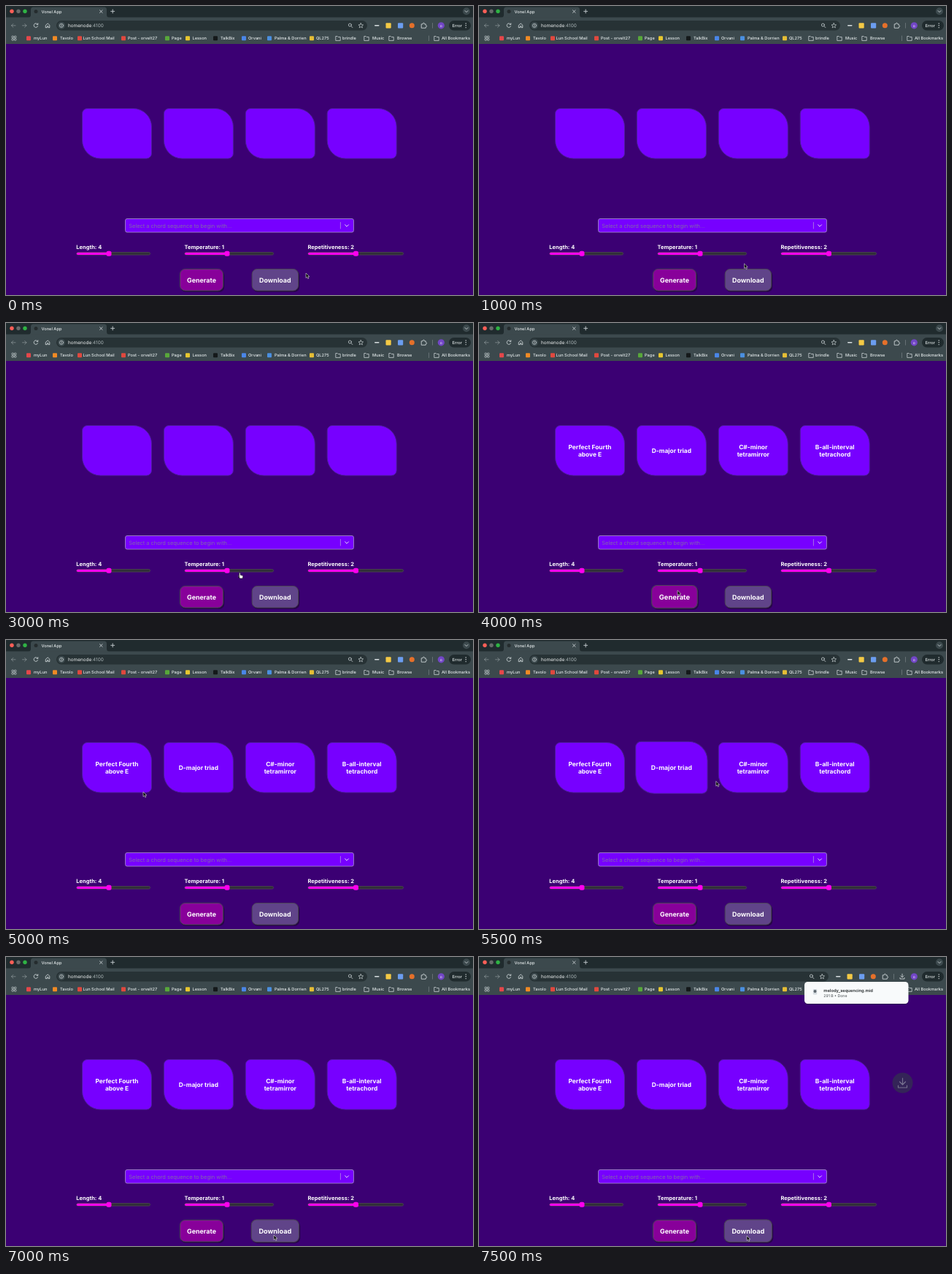
An HTML page for the animation above (8000 ms loop, 640 by 396 pixels).

```html
<!DOCTYPE html>
<html lang="en">
<head>
<meta charset="utf-8">
<title>Chord generator</title>
<style>
html, body { margin: 0; width: 100%; height: 100%; overflow: hidden; background: #3b0073; }
svg { display: block; width: 100vw; height: 100vh; font-family: Inter, "Open Sans", sans-serif; }
text { text-rendering: geometricPrecision; }
.mid { text-anchor: middle; }
.card, .btn { transform-box: fill-box; transform-origin: center; }
.bar { font-size: 5.7px; font-weight: 500; fill: #e3e9ea; }
.line { fill: none; stroke: #c9d1d3; stroke-linecap: round; stroke-linejoin: round; }
</style>
</head>
<body>
<svg id="stage" viewBox="0 0 640 396"></svg>
<script>
const STEP = 500, STEPS = 16;

const rect = (x, y, w, h, r, fill, more = '') =>
  `<rect x="${x}" y="${y}" width="${w}" height="${h}" rx="${r}" fill="${fill}" ${more}/>`;
const dot = (x, y, r, fill) => `<circle cx="${x}" cy="${y}" r="${r}" fill="${fill}"/>`;
const line = (d, w = 0.9, more = '') => `<path class="line" d="${d}" stroke-width="${w}" ${more}/>`;
const text = (x, y, s, attrs = 'class="bar"') => `<text x="${x}" y="${y}" ${attrs}>${s}</text>`;
const folder = x => line(`M${x - 3.2} 47v-5.5h2.4l1 1h3v4.5z`, 0.8);
const bold = size => `class="mid" font-size="${size}" font-weight="700" fill="#fff"`;

// Browser window
function tabStrip() {
  return rect(0, 0, 640, 16, 0, '#202b2e') +
    dot(8, 7.3, 2.7, '#ff5f57') + dot(17, 7.3, 2.7, '#686b6b') + dot(26, 7.3, 2.7, '#2fb344') +
    '<path d="M30 16q4 0 4-4V5q0-3.5 3.5-3.5h97q3.5 0 3.5 3.5v7q0 4 4 4z" fill="#3c494d"/>' +
    dot(41, 7.5, 2.5, '#252c2e') +
    text(48.5, 9.6, 'Vonel App') +
    line('M128.5 5.7l3.6 3.6m0-3.6l-3.6 3.6') +
    line('M143.7 7.3h5m-2.5-2.5v5') +
    dot(631, 7.3, 5, '#3c494d') + line('M629 6.5l2 2 2-2');
}

function toolbar() {
  const nav = line('M13 26.8h-5.5m2.4-2.4l-2.4 2.4 2.4 2.4', 0.9, 'opacity=".45"') +
    line('M22.5 26.8h5.5m-2.4-2.4l2.4 2.4-2.4 2.4', 0.9, 'opacity=".45"') +
    line('M43.3 25a2.8 2.8 0 1 0 .3 2.6m.2-3.8v1.6h-1.7') +
    line('M54.6 26.2l2.6-2.3 2.6 2.3v3.4h-1.8v-2h-1.6v2h-1.8z');
  return rect(0, 15.5, 640, 36.5, 0, '#3c494d') + nav +
    '<rect id="pill" x="69" y="20" width="426" height="13.6" rx="6.8" fill="#273235"/>' +
    dot(76, 26.8, 5, '#3c494d') +
    '<circle class="line" cx="76" cy="26.8" r="2.6" stroke-width=".7"/>' + line('M76 26.6v1.4m0-2.7v.1', 0.8) +
    text(85, 29, 'homenode<tspan fill="#a6b0b2">:4100</tspan>', 'font-size="6.4" fill="#f2f5f5"') +
    '<g id="tools">' +
      '<circle class="line" cx="471.4" cy="26" r="2" stroke-width=".8"/>' + line('M473 27.7l1.8 1.8') +
      line('M486.3 23.5l1 2.2 2.3.2-1.8 1.6.6 2.3-2.1-1.2-2.1 1.2.6-2.3-1.8-1.6 2.3-.2z', 0.7) +
      rect(505, 25.9, 6.5, 1.7, 0.8, '#d9e0e2') +
      rect(520.5, 23.2, 7.2, 7.2, 1, '#f4c945') +
      rect(537, 23.2, 7.2, 7.2, 1, '#6b9df0') +
      dot(556.3, 26.8, 3.5, '#e5702a') +
      line('M569.6 24.8h1.8v-.6a1 1 0 0 1 2 0v.6h1.8v1.8h.4a1 1 0 0 1 0 2h-.4v1.6h-5.6z', 0.9) +
      line('M584.5 23.5v6.6', 0.6, 'opacity=".5"') +
    '</g>' +
    `<g id="tray">${line('M580 23.2v4.6m-2-2l2 2 2-2m-5 2.6v1.6h6v-1.6')}</g>` +
    dot(596.3, 26.8, 4.6, '#7246c6') + text(596.3, 28.7, 'o', 'class="mid" font-size="5" fill="#fff"') +
    rect(607, 20, 30, 13.6, 6.8, '#202b2e') + text(611.5, 28.9, 'Error') +
    [24, 26.8, 29.6].map(y => dot(630.2, y, 0.7, '#e3e9ea')).join('');
}

function bookmarks() {
  const grid = [0, 1, 2, 3].map(i =>
    rect(8 + i % 2 * 3.5, 41.2 + (i >> 1) * 3.5, 2.4, 2.4, 0.3, 'none', 'stroke="#c9d1d3" stroke-width=".7"')).join('');
  const links = [
    [31, 38, 'myLun', '#e4474a'], [67, 74, 'Tavolo', '#f08a24'],
    [101, 105.5, 'Lun School Mail', '#e0483e'], [161, 167, 'Post - orvelt27', '#e0483e'],
    [221, 227, 'Page', '#58a83a'], [249, 255.5, 'Lesson', '#e7c72f'],
    [287, 294, 'TalkBix', '#14191a'], [326, 332, 'Orvani', '#4a86e8'],
    [361, 368, 'Palma &amp; Dorrien', '#4a8fe0'], [419, 425, 'QL275', '#e5bd35']
  ].map(([ix, x, name, color]) => rect(ix - 3, 41.2, 6, 6, 1, color) + text(x, 46.2, name)).join('');
  const folders = [[455, 461, 'brindle'], [494, 502, 'Music'], [528, 536, 'Browse'], [590, 597, 'All Bookmarks']]
    .map(([ix, x, name]) => folder(ix) + text(x, 46.2, name)).join('');
  return grid + links + folders + line('M579.5 41v6.5', 0.6, 'opacity=".5"');
}

// Page
const chords = [['Perfect Fourth', 'above E'], ['D-major triad'], ['C#-minor', 'tetramirror'], ['B-all-interval', 'tetrachord']];

function card(lines, i) {
  const x = 104.5 + i * 111.9, cx = x + 47.5;
  const words = lines.map((s, n) => text(cx, 178.2 + (n - (lines.length - 1) / 2) * 10, s, bold(8.4))).join('');
  return `<g class="card"><path d="M${x + 7} 140.5h63a25 25 0 0 1 25 25v36.5a7 7 0 0 1-7 7h-63a25 25 0 0 1-25-25v-36.5a7 7 0 0 1 7-7z"
    fill="#7700ff" stroke="#4d1c9c"/><g class="chord">${words}</g></g>`;
}

function slider(x, end, thumb, label) {
  return text(x, 332.9, label, 'font-size="7.5" font-weight="700" fill="#fff"') +
    rect(x + 0.5, 337.5, end - x - 1, 3.6, 1.8, '#302f37', 'stroke="#4c4a50" stroke-width=".8"') +
    rect(x + 0.5, 337.7, thumb - x, 3.2, 1.6, '#ff00ee') +
    rect(thumb - 3.5, 335.8, 7, 7, 2.5, '#ff00ee');
}

function button(x, w, fill, label) {
  return `<g class="btn">${rect(x + 1.3, 362, w, 30, 7, '#21083b', 'opacity=".75"')}` +
    rect(x + 0.5, 360.5, w - 1, 29.5, 7, fill, 'stroke="#4c4656"') +
    text(x + w / 2, 379.1, label, bold(8.9)) + '</g>';
}

function page() {
  return rect(0, 52, 640, 344, 0, '#3b0073') + chords.map(card).join('') +
    rect(163.5, 291.5, 313, 18.5, 2.5, '#7700ff', 'stroke="#a894c8" stroke-width=".8"') +
    text(168.3, 303.8, 'Select a chord sequence to begin with...', 'font-size="7.45" fill="#8068a8"') +
    line('M458.4 296.5v8.5', 0.7, 'style="stroke:#b9a2dc"') +
    line('M464.6 299.8l2.4 2.4 2.4-2.4', 1, 'style="stroke:#e6dcf5"') +
    slider(96.3, 198, 141, 'Length: 4') + slider(244.5, 367, 303, 'Temperature: 1') +
    slider(413.5, 545, 479.5, 'Repetitiveness: 2') +
    button(238, 60, '#88009a', 'Generate') + button(336.7, 64.3, '#604489', 'Download');
}

function download() {
  return '<g id="done">' +
    rect(446, 35, 142.5, 30, 4.5, '#1a2022', 'opacity=".4"') + rect(446, 34, 142.5, 30, 4.5, '#f8fafb') +
    rect(457.8, 44, 5.4, 7.4, 1, '#d4dbe0') + dot(460.5, 47, 2, '#5c666d') +
    text(472.3, 47.8, 'melody_sequencing.mid', 'font-size="5.75" font-weight="600" fill="#24292b"') +
    text(472.3, 55.4, '291 B • Done', 'font-size="5.2" fill="#444b4e"') +
    '<circle cx="580.5" cy="172.5" r="14" fill="#33304f" opacity=".75"/>' +
    line('M580.5 166v9m-4-4l4 4 4-4m-10 5v3h12v-3', 1.2, 'opacity=".45"') + '</g>';
}

const pointers =
  `<path id="arrow" d="M0 0v6.6l1.6-1.4 1.1 2.4 1.2-.5-1.1-2.4h2z" fill="#080808" stroke="#ddd" stroke-width=".6"/>
  <path id="hand" d="M-1.5 3.5V-3q0-1 .8-1t.8 1v2.2l3 .8q.8.3.7 1.2l-.5 2.8h-3.8l-2.4-3q.3-1.2 1.4-.2z" fill="#fff" stroke="#111" stroke-width=".6"/>`;

const stage = document.getElementById('stage');
stage.innerHTML = page() + tabStrip() + toolbar() + bookmarks() + download() + pointers;

const $ = id => document.getElementById(id);
const all = name => [...stage.querySelectorAll(name)];
const show = (el, on) => { el.style.display = on ? '' : 'none'; };
const cards = all('.card'), labels = all('.chord'), buttons = all('.btn');

// Pointer stops: step, x, y
const path = [[0, 411, 366], [4, 316, 340], [6, 321, 346], [7, 278, 368], [8, 272, 366.5], [10, 188, 208],
  [12, 461.5, 179], [13, 372, 374], [14, 367, 381], [15, 367, 382]];

function pointerAt(n) {
  const i = Math.max(1, path.findIndex(p => p[0] >= n));
  const [a, ax, ay] = path[i - 1], [b, bx, by] = path[i];
  const k = (n - a) / (b - a);
  return [ax + (bx - ax) * k, ay + (by - ay) * k];
}

function draw(n) {
  const [x, y] = pointerAt(n);
  const onSlider = n >= 4 && n <= 6, saved = n === 15;
  show($('hand'), onSlider);
  show($('arrow'), !onSlider);
  $(onSlider ? 'hand' : 'arrow').setAttribute('transform', `translate(${x} ${y})`);

  labels.forEach(el => show(el, n >= 8));
  cards.forEach((el, i) => {
    const hot = (n === 11 && i === 1) || (n === 12 && i === 2);
    el.style.transform = `scale(${hot ? 1.035 : 1})`;
  });
  buttons[0].style.transform = `scale(${n === 7 || n === 8 ? 1.06 : 1})`;
  buttons[1].style.transform = `scale(${n >= 13 ? 1.03 : 1})`;

  show($('done'), saved);
  show($('tray'), saved);
  $('tools').setAttribute('transform', `translate(${saved ? -16 : 0})`);
  $('pill').setAttribute('width', saved ? 410 : 426);
}

let last = -1;
function tick() {
  const n = Math.floor(performance.now() / STEP) % STEPS;
  if (n !== last) draw(last = n);
  requestAnimationFrame(tick);
}
tick();
</script>
</body>
</html>
```
